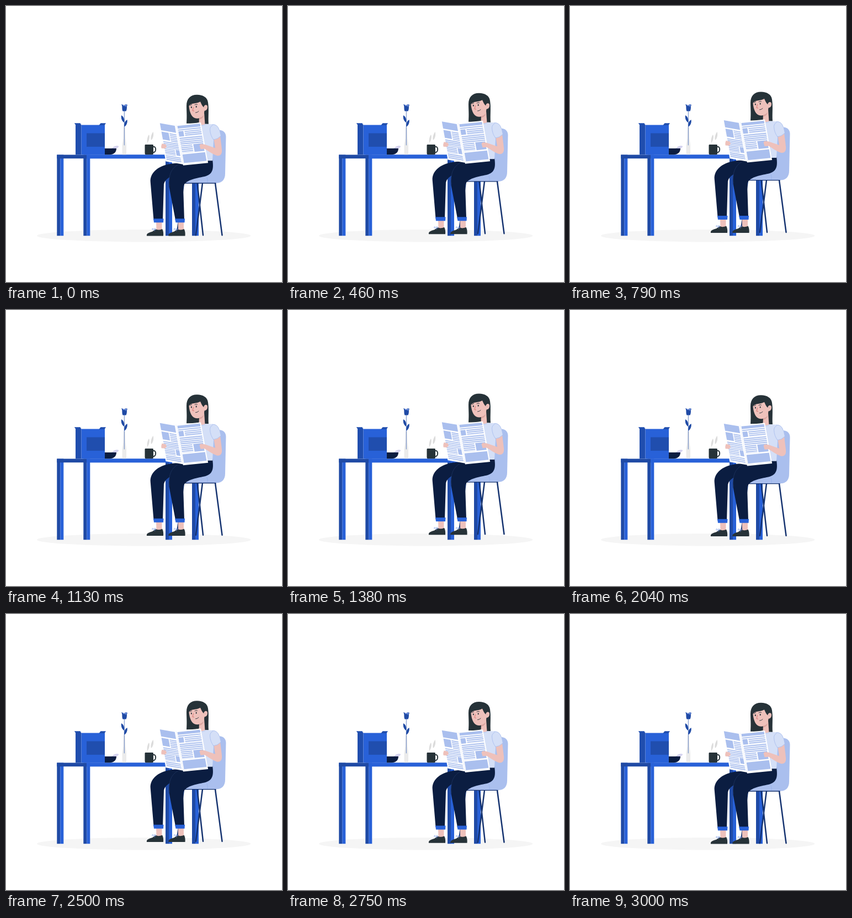
Write an HTML page that moves like this. It is 500 px wide and 500 px high and loops after 3040 ms.

```html
<!DOCTYPE html>
<html lang="en">
<head>
<meta charset="utf-8">
<title>Reading at the table</title>
<style>
  html, body { margin: 0; width: 100%; height: 100%; overflow: hidden; background: #fff; }
  svg { display: block; width: 100vw; height: 100vh; }
  .blue { fill: #2861d8; }
  .mid { fill: #204eae; }
  .deep { fill: #1f4aa5; }
  .navy { fill: #0b1d41; }
  .soft { fill: #aabfee; }
  .pale { fill: #d4dff7; }
  .ink { fill: #263238; }
  .skin { fill: #eec1bb; }
  .line { fill: none; stroke-linecap: round; stroke-linejoin: round; }
  .text { fill: none; stroke: #aabfee; stroke-dasharray: 1.9 1.4; }
</style>
</head>
<body>
<svg viewBox="0 0 500 500">
  <defs>
    <g id="leg">
      <path class="deep" d="M0 269.500h6V416.300H0z"/>
      <path class="blue" d="M6 269.500h6V416.300H6z"/>
    </g>
    <g id="foot">
      <path class="skin" d="M4.500 390h10.500v16h-10z"/>
      <path class="ink" d="M-12.500 415.700c-1-5 5-6 9-7.500 4-1.500 5-4 8-4.500 3 2 7 1 11-.5 2 3 2.500 8 2 12.500z"/>
      <path class="line" d="M-2 405c-2-3 1-4 2-1l2 3M2 405c-2-4 2-4 2 0" stroke="#6f92e4" stroke-width=".8"/>
    </g>
  </defs>

  <ellipse cx="249.700" cy="416.200" rx="193.700" ry="11.200" fill="#f5f5f5"/>

  <!-- table -->
  <path class="blue" d="M146 269.500h203v6.700H146z"/>
  <use href="#leg" x="92.300"/>
  <use href="#leg" x="140.300"/>
  <use href="#leg" x="289"/>
  <use href="#leg" x="337"/>
  <path class="deep" d="M92.300 269.500H146v6.700H92.300z"/>
  <path class="blue" d="M146 269.500h155v6.700H146z"/>

  <!-- box -->
  <path class="mid" d="M126 215.500h10.500v54H126z"/>
  <path class="blue" d="M136.500 215.500H179v54h-42.500z"/>
  <path class="mid" d="M146 230.500h33V255h-33zM123.800 212.300h10.700l2 3.700H126.500zM171.500 212.300H181l-2.500 3.700H168.500z"/>

  <!-- bowl and spoon -->
  <path d="M190 259l5-4c3-2 8-2.500 9-1s-3 4-7 4.500z" fill="#d3d1ee"/>
  <path class="navy" d="M179 258h21c0 7-5 11.300-12 11.300h-9z"/>

  <!-- vase and rose -->
  <path d="M213 220h3l.5 20 1.500 12v17.300h-7.500V252l2-12z" fill="#ebebeb"/>
  <path class="line" d="M214.300 189V252" stroke="#5377bd" stroke-width=".9"/>
  <path class="deep" d="M214 211c-4-2-6-8-5-13 4 2 6 7 5 13zM214.500 219c-1-6 1-11 5-13 1 5-1 10-5 13zM209 178c2 1 4 1 5 2 2-2 4-2 6-1-2 3 0 7-2.500 11.500h-6c-2-4 0-9-2.500-12.500z"/>
  <path class="line" d="M212 179.500c2 2 4 1 6-.5M218 180l-1 2" stroke="#7d9de7" stroke-width="1.200"/>

  <!-- mug and steam -->
  <path class="line" d="M266 255h2c4.500 0 4.500 10.500-2 10.500" stroke="#263238" stroke-width="1.900"/>
  <path class="ink" d="M252.500 251h13q1.500 0 1.500 1.500v14.800q0 2-2 2h-11.500q-2 0-2-2v-14.800q0-1.500 1-1.500z"/>
  <path d="M259 233c-3 4-4 10-3 15 3-3 5-11 3-15zM266.500 228c-3 4-5 10-3.500 15 4-3 5-11 3.500-15z" fill="#dcdcdc"/>

  <g id="reader">
    <!-- chair -->
    <path class="line" d="M322 320L309.500 414M346.500 320L357 414.500M356 320L344 414.500M379 320L391.500 414.500" stroke="#14326f" stroke-width="2.500"/>
    <path class="soft" d="M372 224h14c8 0 12.500 5 12.500 12l-1.500 67c0 11-6 17-16 17h-60l4-25 47-20z"/>
    <path class="line" d="M322 320.300h58" stroke="#14326f" stroke-width="1.300"/>
    <path class="line" d="M364 310q2 5 1 9" stroke="#8ea9e8" stroke-width=".6"/>

    <!-- far leg, then near leg -->
    <use href="#foot" x="267.500"/>
    <path class="navy" d="M330 282L303 284.500C278 287 260.500 300 261.700 318L267.500 387h16.500L286 322C288 312 300 306 318 302z"/>
    <path class="blue" d="M267 384.500h18.500l-.5 7h-17z"/>
    <use href="#foot" x="307"/>
    <path class="navy" d="M374 277C376 292 376 303 362 307.500C348 311 326 313 321 326L323 387h-16L295.500 327C293.500 306 300 292 313 285z"/>
    <path class="line" d="M311 287C299 294 294 306 296 325" stroke="#29406f" stroke-width=".5"/>
    <path class="blue" d="M306 384.500h18l-.5 7h-16z"/>

    <!-- hair, face, neck -->
    <path class="ink" d="M327 212C328 198 327 190 327 180C327 167 334 160 346 160C357 160 365 165 366 174C368 187 366 200 367 213H357L351 210L343 212z"/>
    <path class="skin" d="M350 198l9-6 1.500 22q-5 5-11 0z"/>
    <path class="skin" d="M331.500 180.500C335 174 345 177 352 172.500C354 177 355 180 358.500 183C358 178 365 176.500 365 182C365 187 362 189 359.500 189C359 197 354 203 346 203C337 203 332.500 193 331.500 180.500z"/>
    <path d="M350 202q5-1 8-5-1 6-7.500 8z" fill="#d9a49f"/>
    <path class="line" d="M333.500 179.500l3-1.500M342 178.200q2-1.500 4.500-.5M343.500 192.500q3.500 0 5.500-2.500" stroke="#263238" stroke-width=".9"/>
    <path class="line" d="M339.500 183l-1.500 6 2.500.5" stroke="#d56d68" stroke-width=".9"/>
    <ellipse class="ink" cx="335.800" cy="182.700" rx="1" ry="1.600"/>
    <ellipse class="ink" cx="344.700" cy="181.700" rx="1" ry="1.600"/>
    <path class="line" d="M361 184q1-3 2.500-2" stroke="#d9a49f" stroke-width=".7"/>

    <!-- shirt -->
    <path class="pale" d="M350 214q6 2 11-1l13 .5c6 1 4 20 2 30l-2 36h-22z"/>
    <path class="line" d="M350 215q7 2 11-1" stroke="#aabfee" stroke-width=".6"/>

    <!-- newspaper -->
    <g transform="matrix(1.040 .18 .18 .98 276.300 209.300)">
      <path d="M0 0h30.500v73H0z" fill="#fff"/>
      <path class="soft" d="M2 2h26v13H2zM2 17.500h12.500V32H2zM21.500 47.500h6.500v10.500h-6.500z"/>
      <path class="text" stroke-width="12" d="M22 18V33"/>
      <path class="text" stroke-width="26" d="M15 35V46.500"/>
      <path class="text" stroke-width="18" d="M11 48V59"/>
      <path class="text" stroke-width="26" d="M15 61V70"/>
    </g>
    <g transform="matrix(1 -.1 .18 1.005 308 214.700)">
      <path d="M0 0h45v73H0z" fill="#fff"/>
      <path class="soft" d="M2 2h41v5H2zM2 12h9v9.500H2zM24.500 37h18v14h-18zM2 53.500h41v15.500H2z"/>
      <path class="text" stroke-width="41" d="M22.500 8.700V10.500"/>
      <path class="text" stroke-width="30" d="M28 12.300V22.500"/>
      <path class="text" stroke-width="41" d="M22.500 23.800V35.700"/>
      <path class="text" stroke-width="20.500" d="M12.300 37.300V51"/>
    </g>
    <path class="line" d="M308 214.700L321.200 287.500" stroke="#e8edf8" stroke-width=".8"/>

    <!-- hands and arm -->
    <path class="skin" d="M282.500 248.500l7 1.500 1.500 4.500-3 3-6.500-.5q-1-4 1-8.500z"/>
    <path class="skin" d="M376 238L388 234L391 259C392 268 388 272 381 270C373 267 367 262 360 258L352.500 258.500L350.500 251.500L353 249L360 250L379 256.500z"/>
    <path class="pale" d="M371 214C379 212 385 217 386.500 224L389 235Q383 241 376 241.500Q370 234 369 223Q369 218 371 214z"/>
    <path class="line" d="M376 241.500Q370 234 369.500 223Q369.500 218 374 215.500M389 235Q383 241 376 241.500M374 214Q383 213 386.500 224" stroke="#9fb6eb" stroke-width=".7"/>
  </g>
</svg>
<script>
  const LOOP = 3040, FLOAT = 3000, STEP = 1000 / 24, LIFT = 10, REST = 0.7;
  const reader = document.getElementById("reader");

  // Linear rise and fall, stepped at 24 per second.
  function draw(now) {
    const t = Math.min(FLOAT, Math.floor((now % LOOP + 5) / STEP) * STEP);
    const y = REST - LIFT * (1 - Math.abs(2 * t / FLOAT - 1));
    reader.setAttribute("transform", `translate(0 ${y.toFixed(3)})`);
  }

  function tick() {
    draw(performance.now());
    requestAnimationFrame(tick);
  }
  tick();
</script>
</body>
</html>
```
